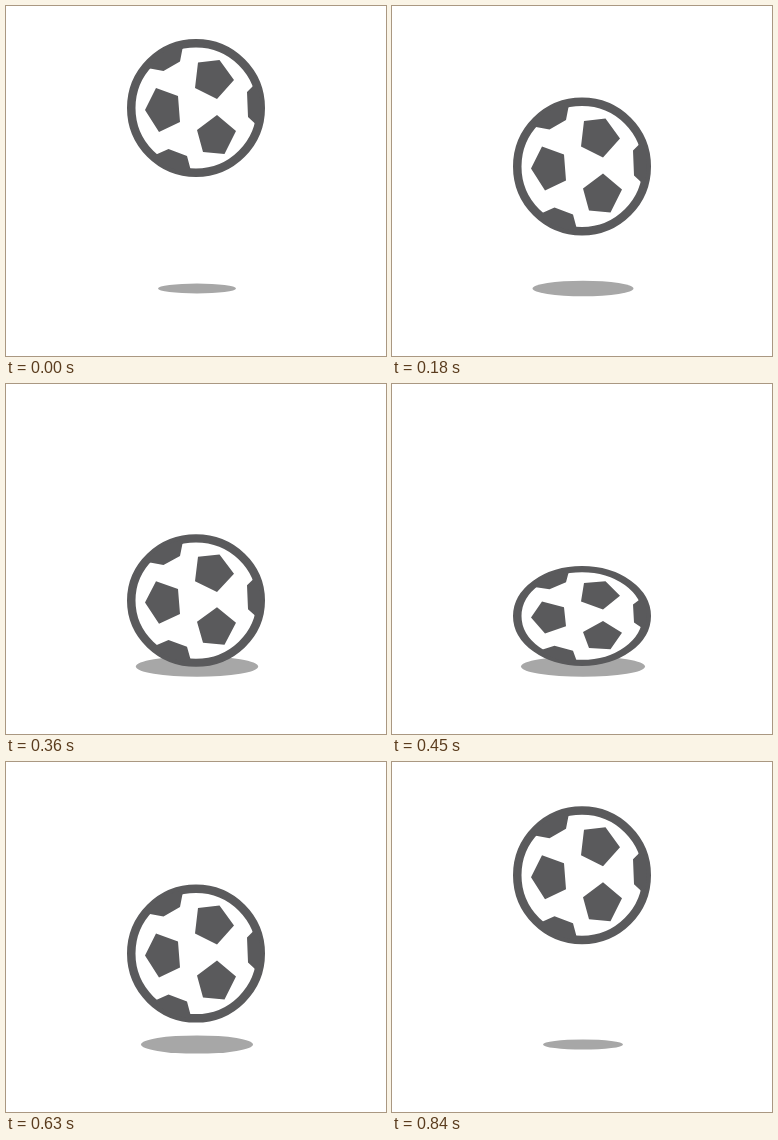
Write an HTML page that moves like this. It is 380x350 px and loops after 0.87 s.

```html
<!DOCTYPE html>
<html lang="en">
<head>
<meta charset="utf-8">
<title>Bouncing ball</title>
<style>
  html, body { margin: 0; width: 100%; height: 100%; overflow: hidden; background: #fff; }
  svg { display: block; width: 100vw; height: 100vh; }
</style>
</head>
<body>
<svg viewBox="0 0 380 350">
  <defs>
    <clipPath id="inside"><circle r="65"/></clipPath>
  </defs>
  <ellipse id="shadow" cx="191" cy="282.5" fill="#a7a7a7"/>
  <g id="ball" fill="#5a5a5c">
    <circle r="64.75" fill="#fff" stroke="#5a5a5c" stroke-width="8.5"/>
    <path d="M2-45.5 23.5-48 38-28 21-9-1-20Z
             M-40-20-18-12-16 14-37 24-51 2Z
             M21 7 40 23 28.5 46 7 44 1 22Z"/>
    <path clip-path="url(#inside)"
          d="M-46-39.5-32.5-37-16-46.5-13-62-40-70-65-40Z
             M-41 47-27.5 41-9 48-5 63-30 75Z
             M57-22 51-16 52 9 59 15.5 75 10 75-20Z"/>
  </g>
</svg>
<script>
  const LOOP = 870, STEP = 30;
  const ball = document.getElementById('ball');
  const shadow = document.getElementById('shadow');

  // time, ball centre y, ball height scale, shadow width, shadow height
  const keys = [
    [0, 102, 1, 78, 10],
    [345, 214, 1, 122, 20.5],
    [450, 232, 0.725, 124, 20.5],
    [570, 214, 1, 121, 20.5],
    [LOOP, 102, 1, 75.5, 9]
  ];

  function pose(t) {
    const i = keys.findIndex(k => k[0] > t);
    const a = keys[i - 1], b = keys[i];
    const p = (t - a[0]) / (b[0] - a[0]);
    return a.map((v, n) => v + (b[n] - v) * p);
  }

  function draw(ms) {
    const t = Math.floor((ms % LOOP) / STEP) * STEP;
    const [, y, squash, w, h] = pose(t);
    ball.setAttribute('transform', `translate(190 ${y}) scale(1 ${squash})`);
    shadow.setAttribute('rx', w / 2);
    shadow.setAttribute('ry', h / 2);
  }

  const start = performance.now();
  function tick() {
    draw(Math.max(0, performance.now() - start));
    requestAnimationFrame(tick);
  }
  tick();
</script>
</body>
</html>
```
